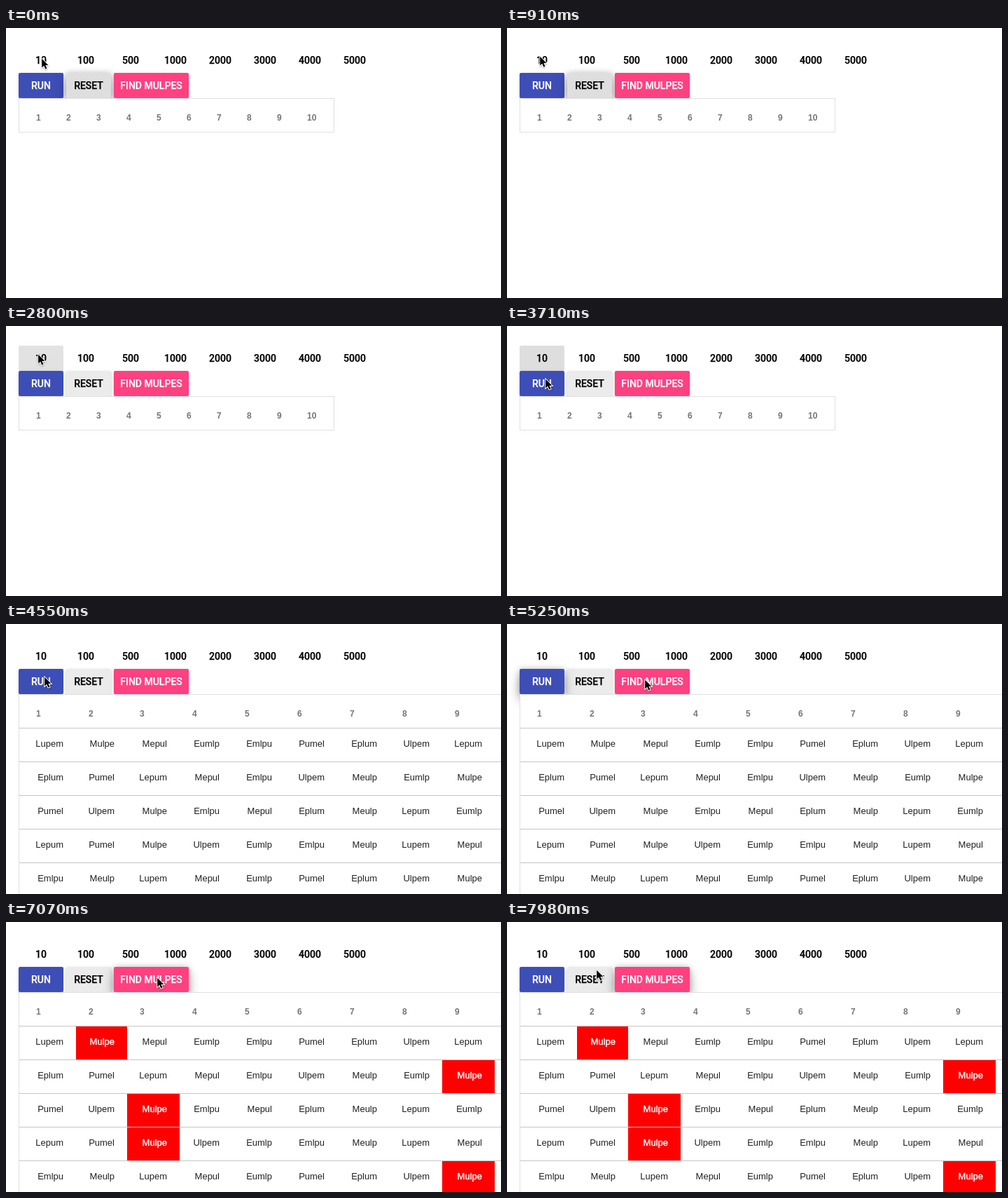
Animation of 707 by 385 pixels, one loop 8000 ms. Source, as an HTML page:

```html
<!DOCTYPE html>
<html lang="en">
<head>
<meta charset="utf-8">
<title>Name table</title>
<style>
html, body { margin: 0; width: 100%; height: 100%; overflow: hidden; background: #fff; }
body { position: relative; }
div, svg { position: absolute; white-space: nowrap; }
.button { height: 36px; border-radius: 2px; text-align: center; font: 500 14px/36px Roboto, sans-serif; -webkit-text-stroke: .25px; color: #000; }
.table { left: 18px; top: 100px; box-sizing: border-box; border: 1px solid rgba(0, 0, 0, .12); background: #fff; }
.head { top: 121px; font: bold 12px/14px "Liberation Sans", sans-serif; color: #757575; }
.line { width: 700px; height: 1px; background: #c6c6c6; }
.cell { box-sizing: border-box; height: 47px; padding: 12px 18px 0 0; text-align: right; font: 13px/19px "Liberation Sans", sans-serif; color: #212121; }
.cell.found { background: #f00; color: #fff; -webkit-text-stroke: .4px; }
</style>
</head>
<body>
<script>
const WANTED = 'Mulpe';
const OTHERS = ['Lepum', 'Pumel', 'Eplum', 'Emlpu', 'Meulp', 'Lupem', 'Eumlp', 'Ulpem', 'Mepul'];
const WANTED_COLUMNS = [1, 8, 2, 2, 8];
const STEP = 70, LOOP = 8000;
const RUN_AT = 4480, FOUND_AT = 6860;

// Pointer moves; each starts where the previous one ended
const START = { x: 50, y: 42 };
const MOVES = [
  { at: 560, length: 490, x: 45, y: 39 },
  { at: 3080, length: 350, x: 54, y: 71 },
  { at: 3500, length: 210, x: 54, y: 74 },
  { at: 4900, length: 490, x: 215, y: 78 },
  { at: 7420, length: 560, x: 127, y: 67 }
];

let seed = 7;
const random = () => (seed = seed * 16807 % 2147483647) / 2147483647;

function shuffle(list) {
  const result = [...list];
  for (let i = result.length - 1; i > 0; i--) {
    const j = Math.floor(random() * (i + 1));
    [result[i], result[j]] = [result[j], result[i]];
  }
  return result;
}

function add(className, left, top, width, text = '', parent = document.body) {
  const el = document.createElement('div');
  el.className = className;
  el.style.left = left + 'px';
  if (top !== null) el.style.top = top + 'px';
  if (width) el.style.width = width + 'px';
  el.textContent = text;
  parent.append(el);
  return el;
}

const sizes = [10, 100, 500, 1000, 2000, 3000, 4000, 5000]
  .map((n, i) => add('button', 18 + 64 * i, 28, 64, n));
const run = add('button', 18, 64, 64, 'RUN');
const reset = add('button', 86, 64, 64, 'RESET');
const find = add('button', 154, 64, 107, 'FIND MULPES');
run.style.background = '#3e4eb7';
find.style.background = '#ff4081';
run.style.color = find.style.color = '#fff';

const table = add('table', 18, 100);
const heads = Array.from({ length: 10 }, (_, c) => add('head', 0, null, 0, c + 1));
const grid = add('grid', 0, 0);
const matches = [];
const columnLeft = c => c < 2 ? 19 + 81 * c : 23 + 75 * c;
WANTED_COLUMNS.forEach((column, r) => {
  const top = 149 + 48 * r;
  add('line', 19, top - 1, 0, '', grid);
  const names = shuffle(OTHERS).slice(1);
  names.splice(column, 0, WANTED);
  names.forEach((name, c) => {
    const left = columnLeft(c);
    const cell = add('cell', left, top, columnLeft(c + 1) - left, name, grid);
    if (name === WANTED) matches.push(cell);
  });
});

document.body.insertAdjacentHTML('beforeend', `
  <svg id="pointer" width="18" height="22" style="left:0;top:0;filter:drop-shadow(0 1px 1px rgba(0,0,0,.3))">
    <path d="M1.2 1.8V14.6L4.2 11.8L6.3 16.6L8.5 15.7L6.4 11H10.4Z" stroke="#fff" stroke-width="1.8" paint-order="stroke"/>
  </svg>`);
const pointer = document.getElementById('pointer');

const fade = (t, start, length = 210) => Math.min(1, Math.max(0, (t - start) / length));
const easeOut = k => 1 - (1 - k) ** 1.7;

function pointerAt(t) {
  let { x, y } = START;
  for (const move of MOVES) {
    const k = easeOut(fade(t, move.at, move.length));
    x += (move.x - x) * k;
    y += (move.y - y) * k;
  }
  return [Math.round(x), Math.round(y)];
}

// Blends the resting shadow into the focused one
function raise(el, focus) {
  const rest = 1 - focus;
  el.style.boxShadow =
    `0 2px 2px rgba(0,0,0,${.14 * rest}), 0 1px 5px rgba(0,0,0,${.12 * rest}),` +
    `0 0 8px rgba(0,0,0,${.18 * focus}), 0 8px 16px rgba(0,0,0,${.36 * focus})`;
}

function draw(time) {
  const t = Math.floor(time / STEP) * STEP;
  const filled = t >= RUN_AT;

  const hover = fade(t, 1890), press = fade(t, 2660), leave = 1 - fade(t, 4410, 140);
  sizes[0].style.background = `rgba(0,0,0,${(.08 * hover + .05 * press) * leave})`;

  const resetFocus = 1 - fade(t, 2590);
  reset.style.background = `rgba(0,0,0,${.078 + .052 * resetFocus})`;
  raise(reset, resetFocus);
  raise(run, fade(t, 4550) * (1 - fade(t, 6650)));
  raise(find, fade(t, FOUND_AT));

  table.style.width = (filled ? 760 : 451) + 'px';
  table.style.height = (filled ? 400 : 49) + 'px';
  heads.forEach((head, c) => {
    const left = !filled || !c ? 43 + 43 * c : columnLeft(c) + 18;
    head.style.left = left + 'px';
  });
  grid.style.display = filled ? '' : 'none';
  matches.forEach(cell => cell.classList.toggle('found', t >= FOUND_AT));

  const [x, y] = pointerAt(t);
  pointer.style.transform = `translate(${x}px,${y}px)`;
}

function tick() {
  draw(performance.now() % LOOP);
  requestAnimationFrame(tick);
}
tick();
</script>
</body>
</html>
```
